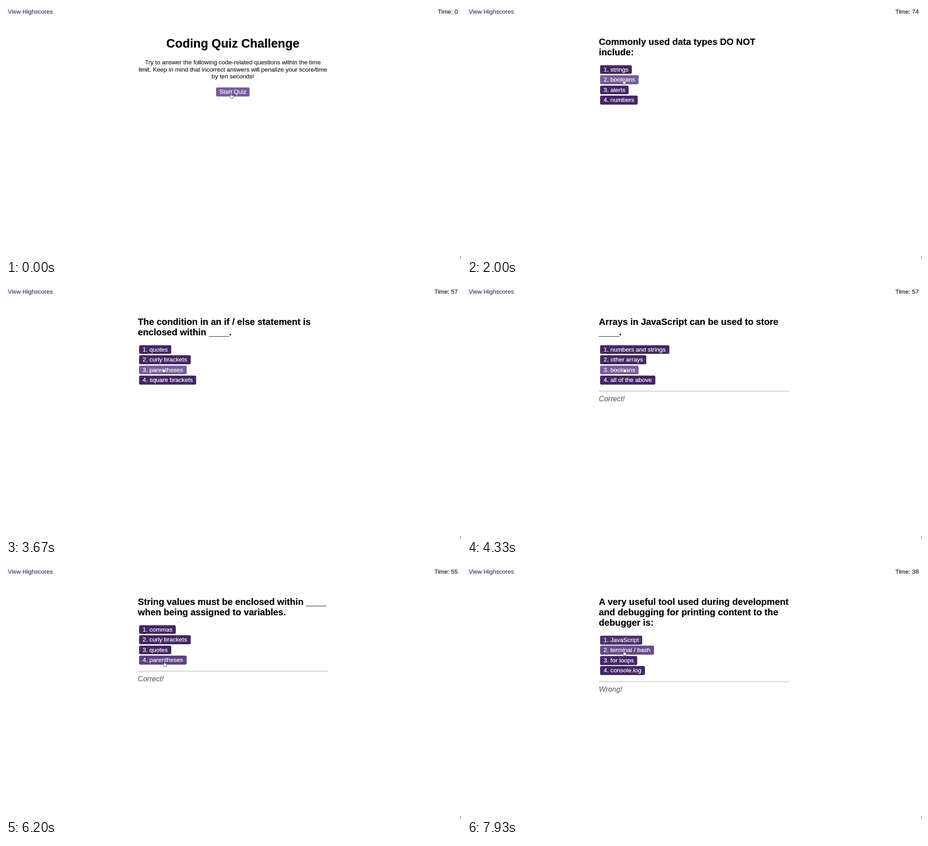
Recreate the animation shown at these times as an HTML page. Size 1005x557 px, loop 8000 ms.

```html
<!DOCTYPE html>
<html lang="en">
<head>
<meta charset="utf-8">
<title>Coding Quiz</title>
<style>
  html, body { margin: 0; width: 100%; height: 100%; overflow: hidden; background: #fff; }
  body { position: relative; font: 13.43px/16px "Liberation Sans", Arial, sans-serif; color: #1c1c1c; white-space: nowrap; -webkit-text-stroke: .2px; }
  .link, .time { position: absolute; top: 5px; }
  .link { left: 4px; color: #4b2a73; }
  .time { right: 7px; }
  .screen { position: absolute; left: 291.3px; top: 67.7px; width: 419.6px; }
  .intro { text-align: center; }
  h1, h2, p { margin: 0; }
  h1, h2 { color: #000; }
  h1 { font-size: 26.86px; line-height: 31.6px; }
  h2 { font-size: 20.15px; line-height: 23.3px; }
  p { margin-top: 18.2px; line-height: 15.5px; }
  .buttons { display: grid; gap: 2.7px; justify-items: start; margin: 16.3px 0 0 3px; }
  .intro .buttons { justify-items: center; margin-left: 0; }
  .button { line-height: 19.8px; padding: 0 7.5px; border-radius: 3px; color: #fff; font-size: 13.5px; }
  .intro .button { font-size: inherit; }
  .feedback { margin-top: 13px; border-top: 3px solid #dedede; padding-top: 6px; font: italic 16.1px/18px "Liberation Sans", Arial, sans-serif; color: #666; }
  .dot { position: absolute; left: 1003px; top: 554px; width: 1.5px; height: 1.5px; background: #555; }
  svg { position: absolute; left: 0; top: 0; overflow: visible; }
</style>
</head>
<body>
<div class="link">View Highscores</div>
<div class="time"></div>
<div class="dot"></div>
<svg width="1" height="1">
  <g id="cursor" stroke-width=".8" stroke-linejoin="round">
    <path id="arrow" d="M0 0V9.6L2.2 7.6L3.8 11L5.4 10.3L3.9 7H6.8Z" fill="#111" stroke="#fff"/>
    <path id="hand" d="M-1 1Q0-.6 1 1V4.2L4.6 5Q5.4 5.3 5.2 6.5L4.5 9V11H-1V9.3L-3.4 6.2Q-3.2 4.8-1 6.4Z" fill="#fff" stroke="#333"/>
  </g>
</svg>
<script>
const LOOP = 8000, STEP = 200 / 3;
const FADE = 200, SAMPLES = 10, HOVER_DELAY = 50;
const DARK = [68, 39, 101], LIGHT = [120, 92, 156];

const screens = [
  { start: -LOOP, buttons: ["Start Quiz"],
    head: "<h1>Coding Quiz Challenge</h1><p>Try to answer the following code-related questions within the time<br>limit. Keep in mind that incorrect answers will penalize your score/time<br>by ten seconds!</p>" },
  { start: 400, buttons: ["1. strings", "2. booleans", "3. alerts", "4. numbers"],
    head: "<h2>Commonly used data types DO NOT<br>include:</h2>" },
  { start: 2470, buttons: ["1. quotes", "2. curly brackets", "3. parentheses", "4. square brackets"],
    head: "<h2>The condition in an if / else statement is<br>enclosed within ____.</h2>", feedback: "Wrong!" },
  { start: 4000, buttons: ["1. numbers and strings", "2. other arrays", "3. booleans", "4. all of the above"],
    head: "<h2>Arrays in JavaScript can be used to store<br>____.</h2>", feedback: "Correct!" },
  { start: 6070, buttons: ["1. commas", "2. curly brackets", "3. quotes", "4. parentheses"],
    head: "<h2>String values must be enclosed within ____<br>when being assigned to variables.</h2>", feedback: "Correct!" },
  { start: 7330, buttons: ["1. JavaScript", "2. terminal / bash", "3. for loops", "4. console.log"],
    head: "<h2>A very useful tool used during development<br>and debugging for printing content to the<br>debugger is:</h2>", feedback: "Wrong!" }
];

// pointer moves: from, to, end point
const home = [497, 193];
const moves = [
  [0, 200, 493, 194], [870, 1070, 423, 177], [1200, 1600, 346, 162],
  [2870, 3500, 347, 180], [4730, 5000, 353, 151.5], [5330, 5930, 350, 211],
  [6400, 7270, 347, 162], [7670, 7930, 347, 187]
];

const $ = s => document.querySelector(s);
const show = (el, on) => { el.style.visibility = on ? "visible" : "hidden"; };
const mix = (a, b, u) => a + (b - a) * u;

function ease(u) {
  u = Math.max(0, Math.min(1, u));
  return u * u * (3 - 2 * u);
}

function pointerAt(t) {
  let [x, y] = home;
  for (const [from, to, endX, endY] of moves) {
    const u = ease((t - from) / (to - from));
    x = mix(x, endX, u);
    y = mix(y, endY, u);
  }
  return [x, y];
}

function isOver(box, screen, t) {
  const [x, y] = pointerAt(t);
  return t >= screen.start + HOVER_DELAY &&
    x >= box.left && x <= box.right && y >= box.top && y <= box.bottom;
}

// A linear fade is the share of the last FADE ms spent over the button.
function glow(box, screen, t) {
  let hits = 0;
  for (let i = 0; i < SAMPLES; i++) hits += isOver(box, screen, t - FADE * i / SAMPLES);
  return hits / SAMPLES;
}

function clock(t) {
  if (t < 400) return 0;
  const wrong = screens.filter(s => s.feedback === "Wrong!" && t >= s.start).length;
  return 75 - Math.max(0, Math.floor((t - 530) / 1000)) - 15 * wrong;
}

for (const s of screens) {
  s.el = document.createElement("div");
  s.el.className = s.feedback || s.start > 0 ? "screen" : "screen intro";
  s.el.innerHTML = s.head +
    `<div class="buttons">${s.buttons.map(b => `<div class="button">${b}</div>`).join("")}</div>` +
    (s.feedback ? `<div class="feedback">${s.feedback}</div>` : "");
  document.body.insertBefore(s.el, $("svg"));
  s.buttonEls = [...s.el.querySelectorAll(".button")];
  s.boxes = s.buttonEls.map(b => b.getBoundingClientRect());
  s.note = s.el.querySelector(".feedback");
}

function draw() {
  const t = Math.floor((performance.now() + 4) % LOOP / STEP) * STEP + 4;
  const current = screens.filter(s => t >= s.start).pop();
  for (const s of screens) {
    show(s.el, s === current);
    if (s.note) show(s.note, s === current && t < s.start + 1000);
  }
  current.buttonEls.forEach((b, n) => {
    const u = glow(current.boxes[n], current, t);
    b.style.background = `rgb(${DARK.map((c, k) => mix(c, LIGHT[k], u))})`;
  });

  const over = current.boxes.some(box => isOver(box, current, t));
  show($("#hand"), over);
  show($("#arrow"), !over);
  $("#cursor").setAttribute("transform", `translate(${pointerAt(t)})`);
  $(".time").textContent = "Time: " + clock(t);
  requestAnimationFrame(draw);
}
draw();
</script>
</body>
</html>
```
